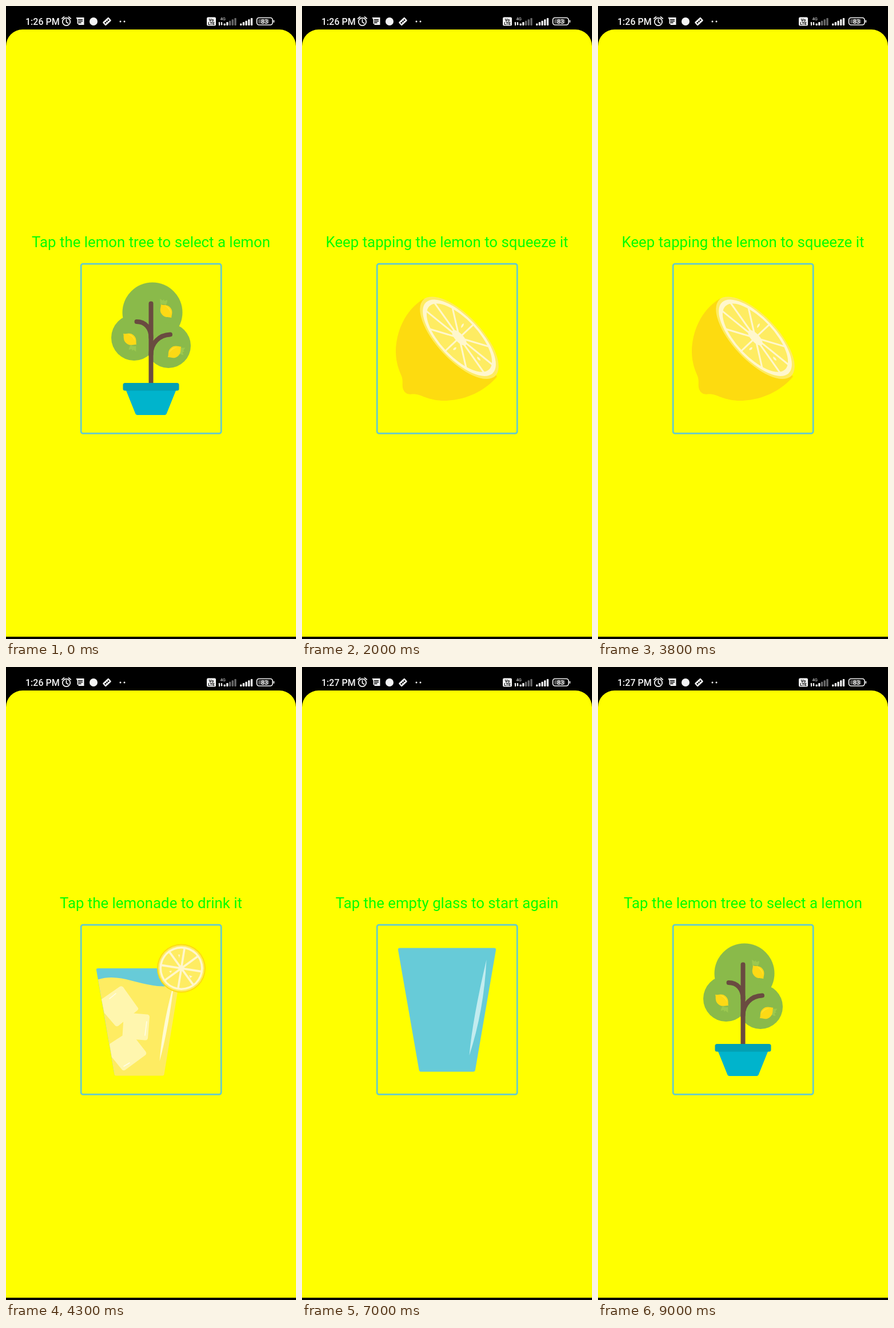
An HTML page for the animation above (9.6 s loop, 507 px wide and 1105 px high).

```html
<!DOCTYPE html>
<html lang="en">
<head>
<meta charset="utf-8">
<title>Lemonade</title>
<style>
  html, body { margin: 0; width: 100%; height: 100%; overflow: hidden; background: #000; }
  svg { display: block; width: 100%; height: 100%; }
  text { font-family: Roboto, "Open Sans", sans-serif; }
  .scene { visibility: hidden; }
  .thin { vector-effect: non-scaling-stroke; }
</style>
</head>
<body>
<svg viewBox="0 0 507 1105" xmlns="http://www.w3.org/2000/svg">
  <defs>
    <g id="fruit">
      <path fill="#fdd915" d="M-15 0C-11 -1 -9 -9.500 0 -9.500S11 -3 15 0C11 2 9 9.500 0 9.500S-11 2 -15 0Z"/>
      <path fill="#ffe22e" d="M-9 -4C-3 -9 5 -8 9 -3C4 -6 -3 -6 -9 -4Z"/>
    </g>
    <path id="leaf" fill="#9bc84f" d="M-6 -6L-1 -3L1 -5L2 -2L7 -4Q7 2 4 5Q0 2 -5 4Z"/>
  </defs>
  <rect width="507" height="1105"/>
  <path fill="#ff0" d="M0 1101V70A29 29 0 0 1 29 41H478A29 29 0 0 1 507 70V1101Z"/>

  <g id="status" fill="#f4f4f4">
    <text id="clock" x="34" y="32.500" font-size="16" font-weight="500"></text>
    <g fill="none" stroke="#f4f4f4" stroke-width="1.800" stroke-linecap="round">
      <circle cx="105.500" cy="27.500" r="6.700"/>
      <path d="M105.500 23.500V28L108.500 30M97.800 22L101.500 19M113.200 22L109.500 19"/>
    </g>
    <path d="M122.500 20H136.500V33H126.500V31H124.500V24Z"/>
    <path stroke="#000" stroke-width="1.400" d="M126 23.700H134M126 26.500H134M126 29.300H131.500"/>
    <circle cx="153" cy="27" r="7"/>
    <g transform="translate(176.500 27) rotate(-42)">
      <rect x="-7" y="-4" width="14" height="8" rx="1.500"/>
      <g fill="#000"><circle cx="-3.500" r="1.400"/><circle r="1.400"/><circle cx="3.500" r="1.400"/></g>
    </g>
    <circle cx="200" cy="27" r="1.500"/><circle cx="207" cy="27" r="1.500"/>
    <rect x="351" y="19.500" width="16" height="15" rx="2.500"/>
    <g fill="#000" font-size="7" font-weight="700" text-anchor="middle">
      <text x="359" y="26.500">Vo</text><text x="359" y="33">LTE</text>
    </g>
    <text x="374.500" y="24.500" font-size="7.500">4G</text>
    <path d="M372 34V30H371L373 27.500L375 30H374V34ZM376 28H378V31.500H379L377 34L375 31.500H376Z"/>
    <rect x="438.500" y="20.500" width="27.500" height="12.500" rx="4" fill="none" stroke="#f4f4f4" stroke-width="1.700"/>
    <rect x="441" y="23" width="19" height="7.500" rx="1.500" fill="#555"/>
    <rect x="467.500" y="24.500" width="1.700" height="4.500" rx=".8"/>
    <text x="452" y="31" font-size="11" font-weight="500" text-anchor="middle">83</text>
  </g>

  <text id="label" x="253.500" y="421" font-size="25.800" text-anchor="middle" fill="#0f0"></text>

  <g class="scene" id="tree">
    <g fill="#8aba4a">
      <circle cx="256" cy="535" r="52.500"/><circle cx="224" cy="579" r="40"/><circle cx="284" cy="593" r="39"/>
    </g>
    <g fill="none" stroke="#6a4b40" stroke-width="8" stroke-linecap="round">
      <path d="M253.500 519.500V660"/>
      <path d="M228.500 551C243 551 253.500 562 253.500 579M287 573.500C268 574 253.500 589 253.500 608"/>
    </g>
    <path fill="#00b4cc" d="M209.500 670H297.500L281 711Q280 714 277 714H230Q227 714 226 711Z"/>
    <rect x="204.500" y="658" width="98" height="13.500" rx="3.500" fill="#03a0b3"/>
    <use href="#leaf" transform="translate(275 517)"/>
    <use href="#leaf" transform="translate(222 597) rotate(185)"/>
    <use href="#leaf" transform="translate(307 602) rotate(95)"/>
    <use href="#fruit" transform="translate(280 532.500) rotate(52)"/>
    <use href="#fruit" transform="translate(216.500 581.500) rotate(40)"/>
    <use href="#fruit" transform="translate(294.500 604) rotate(-38)"/>
  </g>

  <g class="scene" id="lemon">
    <path fill="#fddb10" d="M213 511C181 530 164 568 164 604C164 622 170 637 174 646C177 654 175 659 176 666C178 675 184 679 192 677.500C202 677 208 680 214 682.500C226 687 238 689 248 689C285 689 320 672 341 647Z"/>
    <g class="slice" data-n="10" data-turn="18" transform="translate(275 579.200) rotate(46.800) scale(1 .425)">
      <circle r="91.500" fill="#feec62"/><circle r="85" fill="#fff7cd"/><circle r="76" fill="#feec62"/>
      <circle r="17" fill="#fff7cd"/>
    </g>
    <path fill="#fff7cd" d="M278 562Q278 555 283 554Q283 560 278 562ZM264 600Q266 595 270 596Q269 602 264 600ZM306 612Q312 614 312 619Q306 618 306 612Z"/>
  </g>

  <g class="scene" id="drink">
    <path fill="#67cbd8" d="M161 526H306L276 711Q275.500 713 273 713H193Q190 713 189.500 711L158 529Q157.500 526 161 526Z"/>
    <path fill="#feec62" d="M161 545.500C202 532 238 561 285 557L302 555L276.500 711Q276 713.500 273 713.500H193Q190 713.500 189.500 711Z"/>
    <g fill="#fff6ae">
      <path d="M167 580L198 558.500Q202 556 205 559L230 594Q233 597 229 600L197 626Q193 629 190 625L172 604Z"/>
      <path d="M210 603.500L247 606.500Q251 607 251 611L248 648Q247 652 243 651.500L207 648.500Q203 648 203.500 644L206 607Q206 603 210 603.500Z"/>
      <path d="M181 658L212 638Q216 635 219 639L244 671Q247 675 243 678L209 703Q205 706 202 702L185 681Z"/>
    </g>
    <path stroke="#fffde8" stroke-width="1.600" stroke-linecap="round" d="M181 579L192 570M246 619L243 643M206 697L216 691"/>
    <path fill="#fffbd2" d="M290 565L292 566Q282 640 268.500 688Q273 630 290 565Z"/>
    <g class="slice" data-n="8" data-turn="9" transform="translate(306.500 526)">
      <circle r="42.500" fill="#fddb10"/><circle r="40.500" fill="#feec62"/><circle r="38" fill="#fff7cd"/>
      <circle r="34.500" fill="#feec62"/><circle r="5" fill="#fff7cd"/>
    </g>
    <path fill="#fff7cd" d="M301 502L304 502L303 508ZM320 538L326 540L322 543ZM285 531L290 530L288 534Z"/>
  </g>

  <g class="scene" id="glass">
    <path fill="#67cbd8" d="M171 490.500H336Q339.500 490.500 339 494L303 703Q302.500 706.500 299 706.500H208Q205 706.500 204.500 703L168 494Q167.500 490.500 171 490.500Z"/>
    <path fill="#c3ecef" d="M322.500 511Q318 600 292.500 678Q298 615 322.500 511Z"/>
  </g>

  <rect x="131.200" y="450.200" width="245" height="296" rx="3.500" fill="none" stroke="#62c9d2" stroke-width="2.700"/>
  <rect id="ripple" x="130" y="449" width="247.500" height="298.500" rx="4.500" fill="#fff" opacity="0"/>
</svg>
<script>
const $ = id => document.getElementById(id);

function add(parent, tag, attrs) {
  const el = document.createElementNS("http://www.w3.org/2000/svg", tag);
  for (const key in attrs) el.setAttribute(key, attrs[key]);
  parent.append(el);
}

// Spokes that split each lemon slice into segments
for (const slice of document.querySelectorAll(".slice")) {
  const { n, turn } = slice.dataset;
  const r = n > 8 ? 80 : 36;
  for (let i = 0; i < n; i++) {
    const a = (+turn + i * 360 / n) * Math.PI / 180;
    add(slice, "line", { x2: r * Math.cos(a), y2: r * Math.sin(a), class: "thin",
      stroke: "#fff7cd", "stroke-width": n > 8 ? 3 : 3.6 });
  }
}

// Two sets of signal bars, the first one weak
[[380.5, 2], [409, 5]].forEach(([x, strong]) => {
  for (let i = 0; i < 5; i++) {
    const h = 3.5 + i * 2.4;
    add($("status"), "rect", { x: x + i * 4.7, y: 34 - h, width: 3.3, height: h, rx: 1,
      fill: i < strong ? "#f4f4f4" : "#6a6a6a" });
  }
});

const LOOP = 9600, STEP = 100;
const scenes = [
  [0, "tree", "Tap the lemon tree to select a lemon"],
  [1400, "lemon", "Keep tapping the lemon to squeeze it"],
  [4100, "drink", "Tap the lemonade to drink it"],
  [6100, "glass", "Tap the empty glass to start again"],
  [8000, "tree", "Tap the lemon tree to select a lemon"]
];
const taps = [2900, 3300, 3900, 6000, 7800];

// Quick rise on touch, short hold, then fade
const rippleAlpha = dt =>
  dt < 0 || dt >= 500 ? 0 : dt < 100 ? 0.05 : 0.1 * Math.min(1, (500 - dt) / 300);

function draw(now) {
  const t = Math.floor(now % LOOP / STEP) * STEP;
  const [start, id, label] = scenes.findLast(s => s[0] <= t);
  for (const el of document.querySelectorAll(".scene"))
    el.style.visibility = el.id === id ? "visible" : "hidden";
  $("label").textContent = label;
  $("clock").textContent = t < 6500 ? "1:26 PM" : "1:27 PM";
  const tap = taps.findLast(s => s <= t);
  $("ripple").setAttribute("opacity", tap >= start ? rippleAlpha(t - tap) : 0);
}

const begin = performance.now();
function tick() {
  draw(performance.now() - begin);
  requestAnimationFrame(tick);
}
tick();
</script>
</body>
</html>
```
